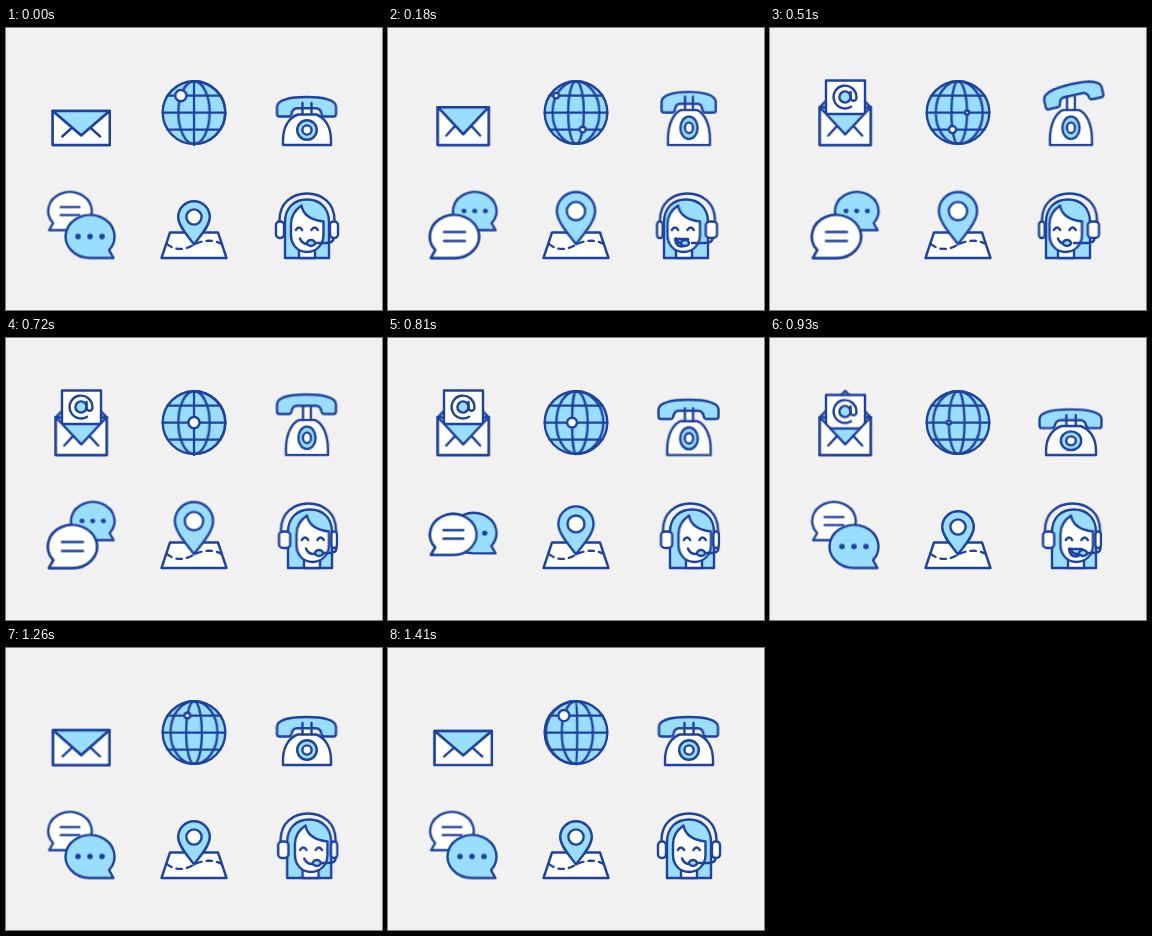
An HTML page that plays this animation: 376x282 px, repeating every 1440 ms.

```html
<!DOCTYPE html>
<html lang="en">
<head>
<meta charset="utf-8">
<title>Contact icons</title>
<style>
  html, body { margin: 0; width: 100%; height: 100%; overflow: hidden; background: #f1f1f1; }
  svg { display: block; width: 376px; height: 282px; }
  svg * { vector-effect: non-scaling-stroke; }
  .ink { fill: none; stroke: #1e429f; stroke-width: 2.4; stroke-linecap: round; stroke-linejoin: round; }
  .w { fill: #fff; }
  .b { fill: #99ddff; }
  .dot { fill: #1e429f; stroke: none; }
  .bare { stroke: none; }
  .anim { animation: 1440ms ease-in-out infinite; }

  /* envelope */
  .env { animation-name: env; transform-origin: 75.2px 117px; }
  .flap { animation-name: flap; transform-origin: 75.2px 83px; }
  .letter { animation-name: letter; }
  @keyframes env {
    0%, 100% { transform: none; }
    11%, 74% { transform: scale(.89, 1.11); }
    79.2% { transform: scale(1.053, .91); }
    87% { transform: scale(.985, 1.02); }
    94% { transform: scale(1.01, .99); }
  }
  @keyframes flap {
    0%, 13% { transform: none; }
    20%, 70% { transform: scaleY(-.97); }
    76%, 100% { transform: none; }
  }
  @keyframes letter {
    0%, 18% { transform: translateY(58px); }
    28% { transform: translateY(-1.5px); }
    32%, 60% { transform: none; animation-timing-function: ease-in; }
    64.6% { transform: translateY(4px); animation-timing-function: linear; }
    71%, 100% { transform: translateY(58px); }
  }

  /* globe: four meridians slide across at even spacing */
  .mer { animation: mer 1440ms linear infinite; transform-origin: 188px 84.6px; animation-delay: calc(var(--i) * -360ms); }
  @keyframes mer { from { transform: scaleX(1); } to { transform: scaleX(-1); } }
  .node { animation: drift 1440ms linear infinite, grow 1440ms ease-in-out infinite; animation-delay: var(--t); }
  @keyframes drift {
    0% { transform: translateX(var(--from)); }
    50%, 100% { transform: translateX(var(--to)); }
  }
  @keyframes grow {
    0%, 50%, 100% { r: 0; stroke-width: 0; }
    11%, 39% { stroke-width: 2.4; }
    25% { r: 5.6px; }
  }

  /* telephone */
  .base { animation-name: base; transform-origin: 301px 117px; }
  .handset { animation-name: handset; }
  @keyframes base {
    0%, 72%, 100% { transform: none; }
    11%, 53% { transform: scale(.875, 1.15); }
    64% { transform: scale(1.04, .95); }
  }
  @keyframes handset {
    0%, 73%, 100% { transform: translate(300.5px, 79px); }
    12.5% { transform: translate(300.7px, 74.5px) scale(.92, 1.06); }
    23% { transform: translate(298px, 66px) rotate(13deg); }
    36% { transform: translate(303px, 66px) rotate(-13deg); }
    48%, 51% { transform: translate(300.5px, 66.5px); }
    64% { transform: translate(300.5px, 81px) scale(1.05, .96); }
  }

  /* speech bubbles */
  .white { animation-name: white; }
  .blue { animation-name: blue; }
  .top { animation: top 1440ms step-end infinite; }
  @keyframes white {
    0%, 62%, 100% { transform: translate(64px, 183px) scale(.89); }
    11%, 51% { transform: translate(66.5px, 208.5px); }
  }
  @keyframes blue {
    0%, 62%, 100% { transform: translate(84px, 208.5px); }
    11%, 51% { transform: translate(86.7px, 183px) scale(.89); }
  }
  @keyframes top {
    0%, 56.5%, 100% { visibility: hidden; }
    5.5% { visibility: visible; }
  }

  /* map pin */
  .pin { animation-name: pin; transform-origin: 188px 217px; }
  @keyframes pin {
    0%, 62%, 100% { transform: none; }
    11%, 51% { transform: scale(1.21); }
  }

  /* operator: parts shift by depth --d as the head turns */
  .turn { animation-name: turn; }
  .padl { animation-name: padl; transform-origin: 270px 202px; }
  .padr { animation-name: padr; transform-origin: 332px 202px; }
  .talk { animation-name: talk; }
  @keyframes turn {
    0%, 97%, 100% { transform: none; }
    11%, 37% { transform: translateX(calc(var(--d) * -1px)); }
    49%, 82% { transform: translateX(calc(var(--d) * 1px)); }
  }
  @keyframes padl {
    0%, 97%, 100% { transform: none; }
    11%, 37% { transform: translateX(-1px) scaleX(.7); }
    49%, 82% { transform: translateX(3px) scaleX(1.4); }
  }
  @keyframes padr {
    0%, 97%, 100% { transform: none; }
    11%, 37% { transform: translateX(-3px) scaleX(1.4); }
    49%, 82% { transform: translateX(-1px) scaleX(.7); }
  }
  @keyframes talk {
    0%, 7%, 30%, 57%, 72%, 100% { opacity: 0; }
    11%, 20%, 62%, 67% { opacity: 1; }
  }
</style>
</head>
<body>
<svg viewBox="0 0 376 282" class="ink">
  <defs>
    <clipPath id="above"><path d="M40 40H112V115H40Z"/></clipPath>
    <path id="mer" d="M188 53.3A31.3 31.3 0 0 1 188 115.9"/>
    <g id="white">
      <path class="w" d="M-23.5 21.5H0A24.5 21.5 0 1 0 -19 13.6Z"/>
      <path d="M-10.5 -4.5H10.5M-10.5 4.5H10.5"/>
    </g>
  </defs>

  <g>
    <g class="anim env">
      <path class="b" d="M46.7 83H103.7V117H46.7Z"/>
      <path class="b anim flap" d="M46.7 83L75.2 107.5L103.7 83Z"/>
    </g>
    <g clip-path="url(#above)">
      <g class="anim letter">
        <path class="w" d="M56 52.5H95V86H56Z"/>
        <circle class="b" cx="75" cy="69" r="5.6"/>
        <path d="M80.6 64V70.5A3 3 0 0 0 86.4 70.5V69A11.4 11.4 0 1 0 81 78.7"/>
      </g>
    </g>
    <g class="anim env">
      <path class="w" d="M46.7 83L75.2 107.5L103.7 83V117H46.7Z"/>
      <path d="M56.2 108.5L65.7 100M94.2 108.5L84.7 100"/>
    </g>
  </g>

  <g>
    <circle class="b" cx="188" cy="84.6" r="31.3"/>
    <path d="M161.7 67.6H214.3M156.7 84.6H219.3M161.7 101.6H214.3"/>
    <use href="#mer" class="mer" style="--i:0"/>
    <use href="#mer" class="mer" style="--i:1"/>
    <use href="#mer" class="mer" style="--i:2"/>
    <use href="#mer" class="mer" style="--i:3"/>
    <circle class="w node" cx="188" cy="67.6" style="--t:-360ms;--from:0px;--to:-26.4px"/>
    <circle class="w node" cx="188" cy="101.6" style="--t:0ms;--from:13.2px;--to:-13.2px"/>
    <circle class="w node" cx="188" cy="84.6" style="--t:-1080ms;--from:15.7px;--to:-15.7px"/>
  </g>

  <g>
    <g class="anim base">
      <path class="w bare" d="M296.5 76H305.5V90H296.5Z"/>
      <path class="w" d="M277 117V112C277 98 284 89 292 86.5H310C318 89 325 98 325 112V117Z"/>
      <circle class="b" cx="301" cy="102" r="9.8"/>
      <circle class="w" cx="301" cy="102" r="4.6"/>
    </g>
    <path class="b anim handset" d="M-29.5 7V0C-29.5 -7 -17 -10 0 -10S29.5 -7 29.5 0V7Q29.5 9.5 27 9.5H18Q15.5 9.5 15 7C14.3 3 13 1.2 9.5 1.2H-9.5C-13 1.2 -14.3 3 -15 7Q-15.5 9.5 -18 9.5H-27Q-29.5 9.5 -29.5 7Z"/>
    <path class="anim base" d="M296.5 75V86M305.5 75V86"/>
  </g>

  <g>
    <use href="#white" class="anim white"/>
    <g class="anim blue">
      <path class="b" d="M23.5 21.5H0A24.5 21.5 0 1 1 19 13.6Z"/>
      <g class="dot">
        <circle cx="-12" r="2.8"/><circle r="2.8"/><circle cx="12" r="2.8"/>
      </g>
    </g>
    <g class="top"><use href="#white" class="anim white"/></g>
  </g>

  <g>
    <path class="w" d="M164 204.5H212L220.5 230H155.5Z"/>
    <path d="M161 216C168 222.5 179 222 186.5 217.5S206 210 216.5 216.5" stroke-dasharray="5.5 5" stroke-width="2.3"/>
    <g class="anim pin">
      <path class="b" d="M188 216.5C183 209 172.2 198.5 172.2 189A15.8 15.8 0 0 1 203.8 189C203.8 198.5 193 209 188 216.5Z"/>
      <circle class="w" cx="188" cy="189" r="7.6"/>
    </g>
  </g>

  <g>
    <path class="anim turn" style="--d:1.5" d="M273.5 194V192C273.5 175 286 165.5 301 165.5S328.5 175 328.5 192V194"/>
    <path class="b anim turn" style="--d:3" d="M279 230V194C279 180 288 171.5 301 171.5S323 180 323 194V230Z"/>
    <path class="w anim turn" style="--d:5" d="M293 230V218H309V230Z"/>
    <path class="w anim turn" style="--d:5.5" d="M285 196C285 188 289 182 295.5 177.5C297 186 304 192 317.5 193.5V207C317.5 217 310 224 301 224S285 217 285 207Z"/>
    <g class="anim turn" style="--d:6">
      <path d="M289.8 202Q293 197 296.2 202M305.4 202Q308.6 197 311.8 202"/>
      <path class="b anim talk" d="M293 211H306Q305 218.5 299.5 218.5T293 211Z"/>
      <path d="M294 210.5Q296 216 302 216"/>
    </g>
    <rect class="w anim padl" x="270" y="193.5" width="8" height="16.5" rx="3.5"/>
    <rect class="w anim padr" x="324" y="193.5" width="8" height="16.5" rx="3.5"/>
    <path class="anim turn" style="--d:3" d="M327.5 210Q327.5 215 320 215H307"/>
    <ellipse class="b anim turn" style="--d:8" cx="305" cy="215" rx="4" ry="3"/>
  </g>
</svg>
</body>
</html>
```
